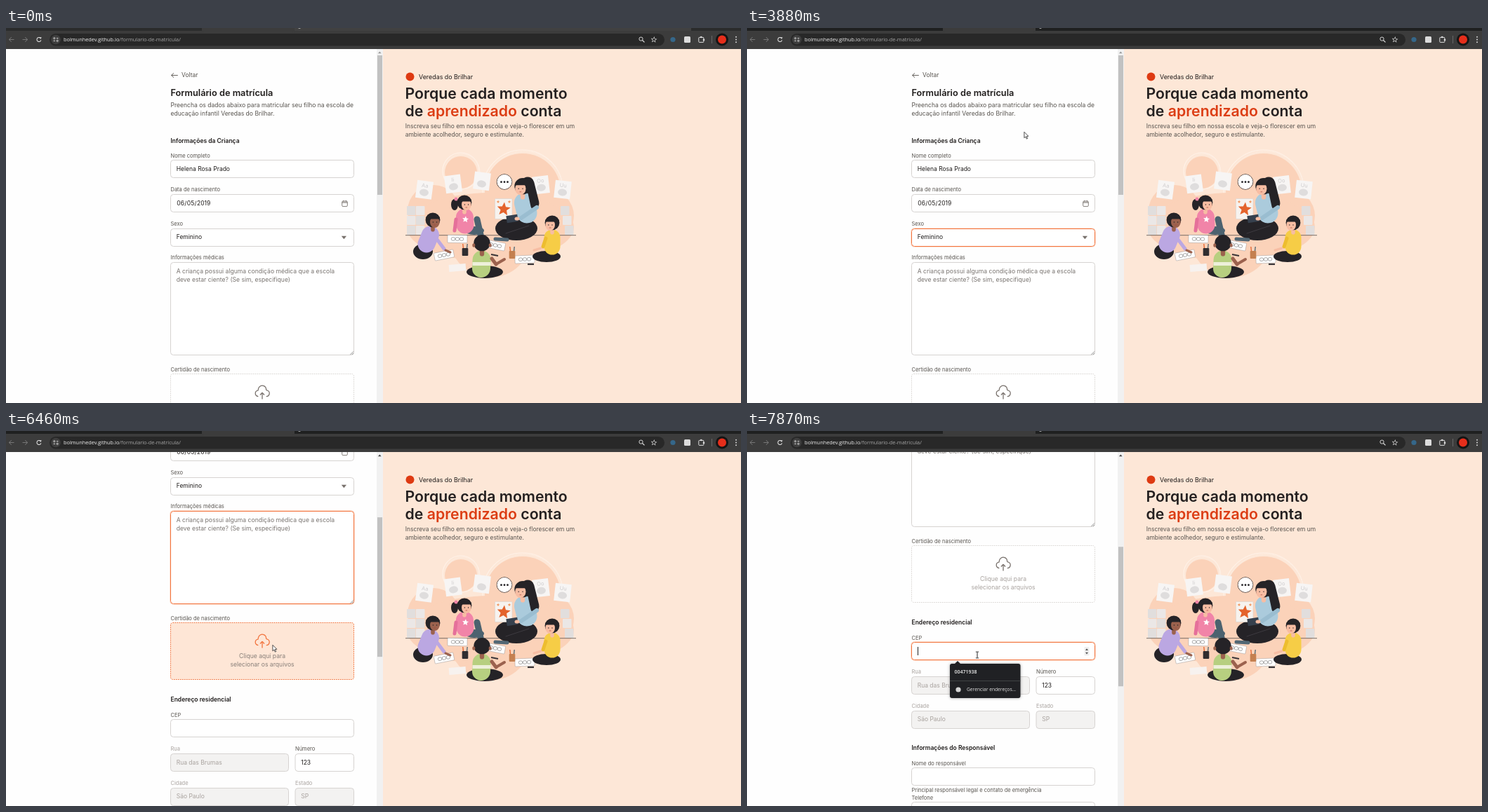
Animation of 1047 by 535 pixels, one loop 8000 ms. Source, as an HTML page with a canvas:

```html
<!DOCTYPE html>
<html lang="pt-BR">
<head>
<meta charset="utf-8">
<style>
html, body { margin: 0; width: 100%; height: 100%; overflow: hidden; background: #fff; }
canvas { display: block; }
</style>
</head>
<body>
<canvas id="stage" width="1047" height="535"></canvas>
<script>
const c = document.getElementById('stage').getContext('2d');
const LOOP = 8000, TAU = Math.PI * 2;
const NOTCH = 36.7;            // scroll distance of one wheel notch
const ROW = 48.6;              // distance between form rows
const LEFT = 234, WIDE = 262;  // form column
const ORANGE = '#f2743e', INK = '#1f1c1b', GRAY = '#57534e', MUTED = '#a8a29e';
const DARK = '#252327', PALE = '#f7bda3', BROWN = '#9c624e', LIGHT = '#ddd';
const SCHOOL = 'Veredas do Brilhar';

const FOCUS = { name: 1400, date: 2230, sex: 3880, notes: 4610, cep: 7800 };
const WHEEL = [
  { from: 5330, to: 5790, notches: 5 },
  { from: 5800, to: 6180, notches: 1 },
  { from: 6930, to: 7230, notches: 3 },
];
const MOVES = [
  { from: 70, to: 70, x: 940, y: 361 },
  { from: 70, to: 170, x: 922.5, y: 326 },
  { from: 430, to: 1270, x: 368, y: 200 },
  { from: 1780, to: 2030, x: 394.5, y: 148 },
  { from: 4900, to: 5220, x: 385, y: 332 },
  { from: 6200, to: 6460, x: 379.5, y: 305 },
  { from: 7080, to: 7600, x: 328, y: 319.5 },
];

const within = (t, a, b) => t >= a && t < b;
function progress(t, { from, to }) {
  const u = Math.min(1, Math.max(0, (t - from) / (to - from || 1)));
  return u * u * (3 - 2 * u);
}
const scrollAt = t => Math.round(WHEEL.reduce((sum, w) => sum + w.notches * NOTCH * progress(t, w), 0));
const pointerAt = t => MOVES.reduce((p, m) => {
  const u = progress(t, m);
  return { x: p.x + (m.x - p.x) * u, y: p.y + (m.y - p.y) * u };
}, MOVES[0]);
const focusAt = t => Object.keys(FOCUS).filter(k => FOCUS[k] <= t).pop();

// ---------- drawing helpers ----------
function text(str, x, y, size = 8.5, color = INK, weight = 400, align = 'left', family = 'Inter, sans-serif') {
  c.font = `${weight} ${size}px ${family}`;
  c.fillStyle = color;
  c.textAlign = align;
  c.fillText(str, x, y + size * 0.35);
  return c.measureText(str).width;
}
const uiText = (str, x, y, size, color, weight = 400) =>
  text(str, x, y, size, color, weight, 'left', '"Open Sans", sans-serif');

function paint(fill, stroke, width = 1) {
  if (fill) { c.fillStyle = fill; c.fill(); }
  if (stroke) { c.strokeStyle = stroke; c.lineWidth = width; c.stroke(); }
}
function rect(x, y, w, h, fill) { c.fillStyle = fill; c.fillRect(x, y, w, h); }
function box(x, y, w, h, r, fill, stroke, width) {
  c.beginPath(); c.roundRect(x, y, w, h, r); paint(fill, stroke, width);
}
function oval(x, y, rx, ry, fill, stroke, width) {
  c.beginPath(); c.ellipse(x, y, rx, ry, 0, 0, TAU); paint(fill, stroke, width);
}
const dot = (x, y, r, fill) => oval(x, y, r, r, fill);
const ring = (x, y, r, color, width) => oval(x, y, r, r, null, color, width);
function line(x1, y1, x2, y2, color, width = 1) {
  c.beginPath(); c.moveTo(x1, y1); c.lineTo(x2, y2); paint(null, color, width);
}
function limb(...args) { c.lineCap = 'round'; line(...args); c.lineCap = 'butt'; }
function at(x, y, angle, draw) {
  c.save(); c.translate(x, y); c.rotate(angle); draw(); c.restore();
}
// dir 1 points down, -1 points up
function triangle(x, y, w, h, color, dir = 1) {
  c.beginPath();
  c.moveTo(x - w / 2, y - dir * h / 2); c.lineTo(x + w / 2, y - dir * h / 2); c.lineTo(x, y + dir * h / 2);
  paint(color);
}
// Arrow whose tip lies at x, y
function arrow(x, y, angle, length, head, color, width) {
  at(x, y, angle, () => {
    line(0, 0, -length, 0, color, width);
    [-1, 1].forEach(s => line(0.3, 0, -head, s * head, color, width));
  });
}
function star(x, y, r, fill) {
  c.beginPath();
  for (let i = 0; i < 10; i++) {
    const a = i * TAU / 10 - TAU / 4 + 0.1, d = i % 2 ? r * 0.45 : r;
    c.lineTo(x + d * Math.cos(a), y + d * Math.sin(a));
  }
  paint(fill);
}

// ---------- browser bar ----------
function browser(t) {
  const active = t >= FOCUS.name - 60;
  rect(0, 0, 1047, 30, '#3c3c3c');
  rect(0, 0, 1047, 4, active ? '#1f2020' : '#2b2c2c');
  if (!active) rect(411, 0, 565, 4, '#414141');
  box(279, -6, 132, 12, 3, '#3c3c3c');
  dot(418, -1, 2, '#aaa');
  box(62, 8, 876, 17.5, 9, '#282828');
  arrow(4.5, 16.5, Math.PI, 7, 3.3, '#777');
  arrow(30.5, 16.5, 0, 7, 3.3, '#777');
  c.beginPath(); c.arc(47, 16.5, 3, 0.3, 5.4); paint(null, LIGHT, 1.1);
  triangle(49.3, 14.6, 3, 2.6, LIGHT);

  dot(71, 16.5, 6.8, '#3f3f3f');
  [-1, 1].forEach(s => {
    line(71 - s, 16.5 - s * -1.8, 71 + s * -3.4, 16.5 + s * 1.8, LIGHT);
    ring(71 + s * 2.2, 16.5 + s * 1.8, 1.1, LIGHT, 0.9);
  });
  const host = uiText('bolmunhedev.github.io', 82, 16.5, 7.35, '#f0f0f0');
  uiText('/formulario-de-matricula/', 82 + host, 16.5, 7.35, '#a5a5a5');

  ring(904.5, 15.6, 2.6, LIGHT); line(906.5, 17.5, 909.5, 20.4, LIGHT, 1.2);
  star(923, 16.7, 4.6, LIGHT); star(923, 16.7, 2.9, '#282828');
  dot(950, 16.5, 3.6, '#35678a');
  box(966, 12, 9, 9, 1.5, '#dcdcdc');
  box(986.8, 13.4, 7, 7, 0.8, null, LIGHT);
  dot(990.2, 13, 1.3, LIGHT); dot(994, 16.9, 1.3, LIGHT);
  rect(1005, 11, 1, 11, '#666');
  dot(1020, 16.5, 9, '#151515'); dot(1020, 16.5, 6, '#e62e1b');
  [-1, 0, 1].forEach(i => dot(1040, 16.5 + i * 3.7, 0.95, LIGHT));
}

// ---------- form ----------
const heading = (str, y) => text(str, LEFT + 0.5, y, 8.5, INK, 600);
const label = (str, x, y, off) => text(str, x + 0.5, y, 7.5, off ? MUTED : GRAY);
const caret = y => rect(LEFT + 9, y, 1, 12, '#222');

// Label, frame and value; y is the middle of the label
function field(name, y, { x = LEFT, w = WIDE, h = 26, value = '', focus, off } = {}) {
  label(name, x, y, off);
  const top = Math.round(y + 6.4);
  if (focus) box(x - 0.5, top - 0.5, w + 1, h + 1, 5, null, '#fde0d1');
  box(x + 0.5, top + 0.5, w - 1, h - 1, 4, off ? '#f3f2f1' : '#fff', focus ? ORANGE : '#d6d3d1');
  return text(value, x + 8.7, y + 19, 8.5, off ? MUTED : INK);
}

function dateValue(t, y) {
  const chosen = within(t, FOCUS.date, 3220) ? [2820, 3020].filter(s => s <= t).length : -1;
  let x = LEFT + 9.3;
  ['06', '05', '2019'].forEach((part, i) => {
    if (i) x += text('/', x, y) + 0.5;
    c.font = '400 8.5px Inter, sans-serif';
    if (i === chosen) rect(x - 0.3, y - 6, c.measureText(part).width + 0.6, 12, '#0a74d6');
    x += text(part, x, y, 8.5, i === chosen ? '#fff' : INK) + 0.3;
  });
  box(478.7, y - 3, 7.6, 7.6, 1.4, null, '#77716c', 0.9);
  rect(478.7, y - 1.6, 7.6, 1.1, '#77716c');
  [480.4, 483.8].forEach(tab => rect(tab, y - 4.2, 0.9, 1.8, '#77716c'));
}

function dropzone(y, hot) {
  c.setLineDash([1.8, 1.2]);
  box(LEFT + 0.5, y + 0.5, WIDE - 1, 81, 3, hot ? '#fee6d6' : '#fff', hot ? ORANGE : '#d2cecb', hot ? 1 : 0.8);
  c.setLineDash([]);
  const ink = hot ? ORANGE : '#78716c';
  at(LEFT + WIDE / 2, y + 27, 0, () => {
    c.beginPath();
    c.arc(-5.5, 1.3, 4.3, 1.6, 4.6);
    c.arc(0, -4.2, 5.6, 3.4, 6.3);
    c.arc(5.8, 1.2, 4.4, -1.4, 1.6);
    paint(null, ink, 1.3);
    arrow(0, 0.5, -TAU / 4, 9, 3, ink, 1.3);
  });
  ['Clique aqui para', 'selecionar os arquivos'].forEach((str, i) =>
    text(str, LEFT + WIDE / 2, y + 48.3 + i * 11.8, 8.6, hot ? '#877f79' : MUTED, 400, 'center'));
}

function childSection(t, focus) {
  const y = i => 182 + i * ROW;
  const blink = Math.floor((t - FOCUS[focus]) / 500) % 2 === 0;
  heading('Informações da Criança', 160.7);
  const nameWidth = field('Nome completo', y(0), { value: 'Helena Rosa Prado', focus: focus === 'name' });
  if (focus === 'name' && blink) rect(LEFT + 9 + nameWidth, y(0) + 13, 1, 12, '#222');
  field('Data de nascimento', y(1), { focus: focus === 'date' });
  dateValue(t, y(1) + 19.4);
  field('Sexo', y(2), { value: 'Feminino', focus: focus === 'sex' });
  triangle(481.4, y(2) + 19.8, 7.2, 4.4, '#78716c');

  field('Informações médicas', y(3), { h: 133, focus: focus === 'notes' });
  ['A criança possui alguma condição médica que a escola', 'deve estar ciente? (Se sim, especifique)']
    .forEach((str, i) => text(str, LEFT + 8.7, y(3) + 19.5 + i * 12, 8.6, '#78736f'));
  [2.2, 4.6].forEach(d => line(495 - d, 466, 495, 466 - d, '#777', 0.8));
  if (focus === 'notes' && blink) caret(342);

  label('Certidão de nascimento', LEFT, 487.6);
  dropzone(493, within(t, 6130, 6990));
}

function addressSection(t, focus) {
  const y = i => 625 + i * ROW, left = { w: 169, off: true }, right = { x: 411.5, w: 84.5 };
  heading('Endereço residencial', 603.2);
  field('CEP', y(0), { focus: focus === 'cep' });
  if (focus === 'cep') caret(638);
  if (t >= 7130) {
    box(480.5, 638, 7, 12.5, 1, '#efefef');
    [-1, 1].forEach(dir => triangle(484, 644.4 + dir * 2.8, 4, 2.7, '#555', dir));
  }
  field('Rua', y(1), { ...left, value: 'Rua das Brumas' });
  field('Número', y(1), { ...right, value: '123' });
  field('Cidade', y(2), { ...left, value: 'São Paulo' });
  field('Estado', y(2), { ...right, value: 'SP', off: true });
}

function guardianSection() {
  heading('Informações do Responsável', 782.2);
  field('Nome do responsável', 804);
  label('Principal responsável legal e contato de emergência', LEFT, 842.6);
  field('Telefone', 853);
}

function form(t) {
  const scroll = scrollAt(t), focus = focusAt(t);
  rect(0, 29, 528, 506, '#fefefe');
  c.save();
  c.translate(0, -scroll);
  arrow(235.8, 67.5, Math.PI, 9, 3.2, GRAY, 0.9);
  text('Voltar', 250, 67.3, 8.5, GRAY);
  text('Formulário de matrícula', LEFT + 0.5, 93, 12.75, INK, 600);
  ['Preencha os dados abaixo para matricular seu filho na escola de', `educação infantil ${SCHOOL}.`]
    .forEach((str, i) => text(str, LEFT + 0.5, 109.6 + i * 12, 8.55, GRAY));
  childSection(t, focus);
  addressSection(t, focus);
  guardianSection();
  c.restore();

  rect(528, 29, 9, 506, '#f1f1f1');
  rect(529, 39 + scroll * 0.3825, 7, 199, '#c1c1c1');
  triangle(532.3, 34.9, 4.6, 2.6, scroll ? '#444' : '#999', -1);
}

// ---------- illustration ----------
function scenery() {
  const bumps = [[648, 206, 23], [736, 233, 54], [609, 261, 37], [772, 268, 37], [690, 298, 58]];
  bumps.slice(0, 2).forEach(([x, y, r]) => { ring(x, y - 2, r + 3, '#fff2e8', 1.1); ring(x + 2, y - 1, r + 2, '#fdeee2', 0.8); });
  bumps.forEach(([x, y, r]) => dot(x, y, r, '#fbd2b9'));
  oval(690, 284, 119, 49, '#fbd2b9');

  ['Aa', 'Ii', '', 'Oo', 'Uu'].forEach((letters, i) => {
    const x = i < 3 ? 596 + 41 * i : 762 + 31 * (i - 3);
    at(x, 218 + 13 * ((x - 695) / 100) ** 2, 0.13 * Math.cos(i * 3), () => {
      rect(-11.5, -12.5, 23, 25, '#f7f5f4');
      text(letters, 0, -6, 7.5, '#cfcdce', 400, 'center');
      oval(0, 4, 6.5, 5, '#dfdddd');
    });
  });
  for (let i = 0; i < 9; i++) {
    const side = i % 3 === 2;
    box(side ? 790 + (i - 2) : 571 + (i % 3) * 13, 254 + Math.floor(i / 3) * 14, 12.5, 13, 1, i % 2 ? '#ebe7e6' : '#e1dedd');
  }
  line(569, 295.7, 812, 295.7, '#55504f', 0.8);
}

// Seated figure around the middle of the head; look is -1, 0 (from behind) or 1
function person(x, y, { r = 8, skin = PALE, top, legs = DARK, torso, lap, look = 1 }) {
  oval(x + lap.dx, y + lap.dy, lap.rx, lap.ry, legs);
  limb(x + torso.dx * 0.4, y + r * 2.5, x + torso.dx, y + torso.dy, top, torso.w);
  limb(x, y + r, x, y + r * 1.6, skin, r * 0.7);
  dot(x, y - r * 0.15, r * 1.3, DARK);
  if (!look) {
    [-1, 1].forEach(s => oval(x + s * r * 1.3, y + 2, 2, 2.8, skin));
    return;
  }
  const fx = x + look * r * 0.35, fy = y + r * 0.25;
  oval(fx, fy, r * 0.85, r, skin);
  [-0.3, 0.35].forEach(d => dot(fx + d * r, fy, 0.7, DARK));
  line(fx - 1.3, fy + r * 0.5, fx + 1.3, fy + r * 0.5, '#a5453c', 0.7);
  c.beginPath(); c.ellipse(x, y - r * 0.3, r * 1.25, r, 0, Math.PI, TAU); paint(DARK);
}

function teacher() {
  limb(743, 222, 750, 250, DARK, 19);
  person(736, 227, { r: 9, top: '#abcbdc', look: -1, torso: { dx: 6, dy: 37, w: 29 }, lap: { dx: -9, dy: 59, rx: 30, ry: 17 } });
  limb(746, 226, 752, 254, DARK, 9);
  limb(697, 301, 714, 302, '#526774', 5);
  limb(745, 282, 712, 293, '#3d3a40', 1);
  box(696.5, 243.5, 24.5, 29, 1, '#f7f3ef', '#d9d3ce', 0.6);
  star(709, 258.5, 10, '#e4632c');
  [-1, 1].forEach(s => star(709 + s * 8, 248, 2.4, '#f09a64'));
  at(721, 272, -0.15, () => rect(-8, -5, 16, 10, '#36404d'));
  limb(756, 256, 734, 271, '#9abdd0', 6);
  oval(728, 272, 3.5, 2.6, PALE);
  ring(710, 219.5, 10.8, '#4a4546', 1); dot(710, 219.5, 10.4, '#fff');
  [-1, 0, 1].forEach(i => dot(710 + i * 4.5, 219.7, 1.4, DARK));
}

function children() {
  oval(639, 252, 5, 8, DARK); dot(641, 244, 2.5, '#f184a8');
  person(653, 250, { top: '#f184a8', legs: '#4c626f', torso: { dx: 1, dy: 31, w: 25 }, lap: { dx: 14, dy: 39, rx: 14, ry: 6 } });
  limb(671, 273, 677, 299, '#4c626f', 9);
  limb(673, 303, 682, 303, DARK, 4);
  limb(641, 273, 639, 289, '#e5709a', 5);
  star(654.5, 273, 4.8, '#fff');

  person(608, 275, { skin: BROWN, top: '#bba7e2', torso: { dx: -9, dy: 33, w: 25 }, lap: { dx: -14, dy: 44, rx: 14, ry: 11 } });
  limb(612, 299, 624, 315, '#bba7e2', 5);
  limb(626, 317, 633, 320, BROWN, 3);

  person(678, 308, { r: 9, skin: BROWN, top: '#b7cf80', look: 0, torso: { dx: -1, dy: 35, w: 26 }, lap: { dx: 4, dy: 40, rx: 26, ry: 9 } });
  rect(664.5, 334, 26, 5, '#edf0da');
  limb(692, 329, 698, 337, BROWN, 5); limb(698, 337, 710, 330, BROWN, 4);

  person(778, 279, { top: '#f6cd46', look: -1, torso: { dx: 0, dy: 33, w: 23 }, lap: { dx: -8, dy: 47, rx: 20, ry: 8 } });
  limb(769, 300, 765, 312, '#edbd2f', 5); limb(762, 314, 752, 317, PALE, 3);
}

function papers() {
  [[643, 301], [624, 324], [739, 330], [697, 310]].forEach(([x, y], i) => at(x, y, 0.2 * Math.cos(i * 1.5 + 1.5), () => {
    box(-14, -5.5, 28, 11, 1, '#fff', '#8a8686', 0.4);
    [-1, 0, 1].forEach(n => oval(n * 6, 0, 2.8, 2.4, null, '#777', 0.6));
  }));
  at(643, 342, -0.08, () => rect(-12, -5, 24, 10, '#f7f2ef'));
}
function cup(x, y, color) {
  [-2, 2].forEach(d => line(x + d, y, x + d * 1.6, y - 11, d < 0 ? '#e4632c' : '#4c626f', 1.3));
  box(x - 4.3, y - 5, 8.6, 11, 1, color);
}

function panel() {
  rect(537, 29, 510, 506, '#fde7d7');
  dot(575.5, 69.5, 6, '#de3a12');
  text(SCHOOL, 588, 69.5, 8.9);
  text('Porque cada momento', 568.5, 93.9, 21.25, '#242020', 600);
  let x = 568.5;
  [['de ', '#242020'], ['aprendizado', '#dc3d14'], [' conta', '#242020']]
    .forEach(([str, color]) => { x += text(str, x, 118.9, 21.25, color, 600); });
  ['Inscreva seu filho em nossa escola e veja-o florescer em um', 'ambiente acolhedor, seguro e estimulante.']
    .forEach((str, i) => text(str, 568.7, 140.5 + i * 11.8, 8.45, GRAY));
  scenery();
  teacher();
  papers();
  children();
  cup(654, 319, '#302d30');
  cup(721, 323, '#c48050');
  line(691, 323, 701, 325, '#383437', 2);
  line(743, 337, 752, 337, '#383437', 2.2);
}

// ---------- overlays ----------
function suggestions() {
  c.save();
  c.shadowColor = 'rgba(0,0,0,.35)'; c.shadowBlur = 4;
  box(289, 332, 100.5, 49, 3, '#202124');
  c.restore();
  triangle(300, 330.2, 9, 4.6, '#202124', -1);
  uiText('00471938', 295.5, 344, 7, '#f1f1f1', 600);
  rect(289, 356, 100.5, 0.8, '#4a4b4e');
  dot(301, 369, 3.6, '#d5d5d5');
  uiText('Gerenciar endereços...', 313, 369, 6.7, '#e2e2e2');
}

function pointer(t) {
  if (t < MOVES[0].from) return;
  const { x, y } = pointerAt(t);
  if (within(t, 1200, 1880) || t >= 7130) {
    line(x, y - 4, x, y + 4, '#222');
    [-4.4, 4.4].forEach(d => line(x - 2.2, y + d, x + 2.2, y + d, '#222', 0.9));
    return;
  }
  at(x, y, 0, () => {
    c.beginPath();
    c.moveTo(0.4, 0.3); c.lineTo(0.4, 8.8); c.lineTo(2.4, 7); c.lineTo(3.8, 10.2);
    c.lineTo(5.2, 9.5); c.lineTo(3.8, 6.5); c.lineTo(6.3, 6.3); c.closePath();
    paint('#fff', '#222', 0.8);
  });
}

function frame() {
  const t = performance.now() % LOOP;
  form(t);
  panel();
  browser(t);
  if (t >= 7840) suggestions();
  pointer(t);
  requestAnimationFrame(frame);
}
frame();
</script>
</body>
</html>
```
